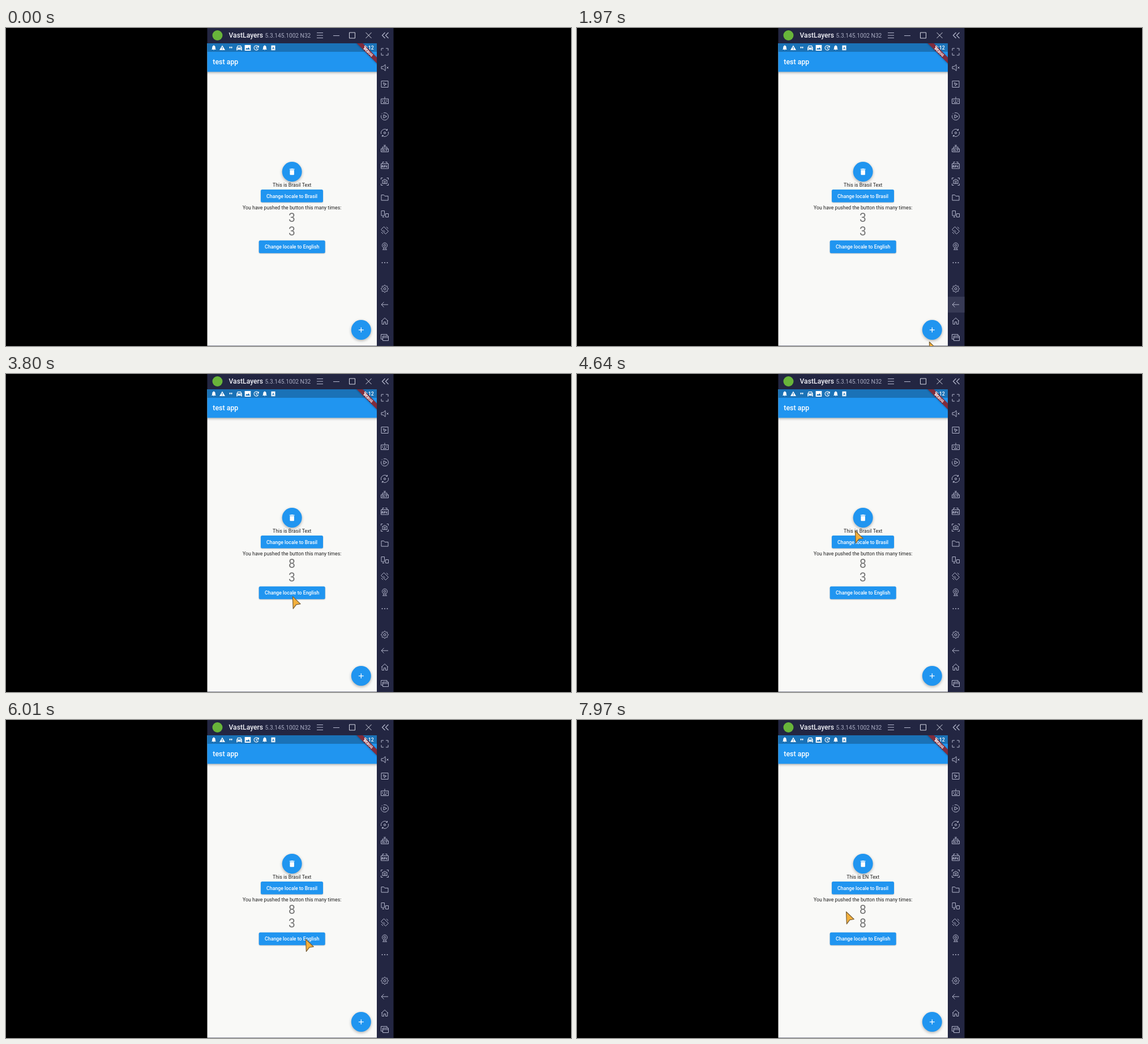
Animation of 998x561 px, one loop 8000 ms. Source, as an HTML page with a canvas:

```html
<!DOCTYPE html>
<html lang="en">
<head>
<meta charset="utf-8">
<title>Locale counter</title>
<style>
html, body { margin: 0; width: 100%; height: 100%; overflow: hidden; background: #000; }
canvas { display: block; width: 998px; height: 561px; }
</style>
</head>
<body>
<canvas id="stage" width="998" height="561"></canvas>
<script>
const c = document.getElementById('stage').getContext('2d');
const LOOP = 8000;
const BLUE = '#2095f0', FRAME = '#232642', ICON = '#b4b7cd';
const LEFT = 355.5, WIDTH = 299.5, TOP = 27;
const TRASH = new Path2D('M6 19c0 1.1.9 2 2 2h8c1.1 0 2-.9 2-2V7H6v12zM19 4h-3.5l-1-1h-5l-1 1H5v2h14V4z');
const PLUS = new Path2D('M19 13h-6v6h-2v-6H5v-2h6V5h2v6h6v2z');
const ARROW = new Path2D('M.5 .8L14.3 14L6.8 15.2L1.4 22.4Z');
const BELL = new Path2D('M-4 3H4L2.8 1.6V-1Q2.6-3.6.6-3.9V-4.6H-.6V-3.9Q-2.6-3.6-2.8-1V1.6ZM-1 3.5H1L0 4.6Z');

// Sidebar icons, drawn around their own centre
const SIDE = [
  [42, 'M-6-2V-6H-2M2-6H6V-2M6 2V6H2M-2 6H-6V2'],
  [70, 'M-6-2H-3L1-5.5V5.5L-3 2H-6ZM3.5-1.5L6.5 1.5M6.5-1.5L3.5 1.5'],
  [99, 'M-6-5.5H6V5.5H-6ZM-2.5-2.5L3 0L.5 .8L-.5 3.2Z'],
  [128, 'M-6.5-3H6.5V5.5H-6.5ZM0-3V-6.5M-4.5-.5H-3M-1-.5H1M3-.5H4.5M-4.5 1.5H-3M-1 1.5H1M3 1.5H4.5M-3 3.5H3'],
  [156, 'M-2-6.2A6.5 6.5 0 1 1-6.2-2M-5.5-4.2L-4.2-5.4M-2-3L3.5 0L-2 3Z'],
  [185, 'M-6.2 2A6.5 6.5 0 0 1 4.5-4.6M6.2-2A6.5 6.5 0 0 1-4.5 4.6M4.5-7V-4.4H2M-4.5 7V4.4H-2M-1.6 0A1.6 1.6 0 1 0 1.6 0A1.6 1.6 0 1 0-1.6 0'],
  [213, 'M-6.5 0H6.5V5.5H-6.5ZM-4 0V-3H4V0M0-3V-6M-2-6H2M-4 4V2H-2V4M0 2V4M3 2V4M2 2H4.5'],
  [242, 'M-6.5-2.5H6.5V6H-6.5ZM-4-2.5V-5.5H-1M4-2.5V-5.5H1M-5 4V.5H-3V4M-5 2.5H-3M-1 4V.5H1V2.5H-1M3 .5V4M5 .5L3 2.2L5 4'],
  [271, 'M-6.5-3.5V-6.5H-3.5M3.5-6.5H6.5V-3.5M6.5 3.5V6.5H3.5M-3.5 6.5H-6.5V3.5M-4-2.5H-2L-1-4H1L2-2.5H4V3.5H-4ZM-1.5.5A1.5 1.5 0 1 0 1.5.5A1.5 1.5 0 1 0-1.5.5'],
  [299, 'M-6-4.5H-1.5L0-2.5H6V5H-6Z'],
  [328, 'M-6-5.5H-.5V3H-6ZM1.5-.5H6.5V5.5H1.5ZM-4 5.5H-1M-3 4.5L-4 5.5'],
  [357, 'M-6.5-1.5L-1.5-6.5L6.5 1.5L1.5 6.5ZM3-6.2L6-3M-6 3L-3 6.2M-2.5-.5L.5 2.5'],
  [385, 'M-4.5-1.5A4.5 4.5 0 1 0 4.5-1.5A4.5 4.5 0 1 0-4.5-1.5M-1.8-1.5A1.8 1.8 0 1 0 1.8-1.5A1.8 1.8 0 1 0-1.8-1.5M-2 3V5.5M2 3V5.5M-4 6H4'],
  [488, 'M6 0H-6M-1.5-4.5L-6 0L-1.5 4.5'],
  [517, 'M-6 0L0-5.5L6 0M-4.8-1V5.5H-1.5V1.5H1.5V5.5H4.8V-1'],
  [546, 'M-3.5-2.5H6.5V5.5H-3.5ZM-3.5 3H-6.5V-5.5H4V-2.5M-3.5 0H6.5']
].map(([y, d]) => [y, new Path2D(d)]);

// Pointer waypoints: time, x, y
const PASS = [[30, 671, 12], [130, 505, 532]];
const PATH = [
  [1270, 672, 40], [1500, 424, 230], [1800, 660, 480], [1970, 622, 553],
  [2070, 613, 540], [2140, 624, 536], [2300, 624, 536], [2400, 629, 536],
  [3400, 629, 536], [3800, 506, 392], [4100, 498, 275], [4240, 500, 298],
  [4640, 491, 276], [4800, 487, 282], [5040, 531, 296], [5250, 512, 275],
  [5500, 557, 330], [5750, 545, 401], [5910, 529, 386], [7370, 529, 386],
  [7450, 534, 388], [7800, 464, 346], [7970, 475, 337.5], [8000, 475, 337.5]
];
const CLICKS = [2580, 2750, 2910, 3070, 3230];
const PRESS = 6400, SWAP = 6560;

function slope(keys, i, axis) {
  const a = keys[i - 1], b = keys[i], d = keys[i + 1];
  if (!a || !d) return 0;
  if ((a[1] === b[1] && a[2] === b[2]) || (d[1] === b[1] && d[2] === b[2])) return 0;
  const before = b[axis] - a[axis], after = d[axis] - b[axis];
  return before * after <= 0 ? 0 : (before + after) / (d[0] - a[0]);
}

function pointAt(keys, t) {
  const i = keys.findIndex((k, n) => n + 1 < keys.length && t >= k[0] && t < keys[n + 1][0]);
  if (i < 0) return null;
  const a = keys[i], b = keys[i + 1], span = b[0] - a[0], u = (t - a[0]) / span;
  const s = u * u * (3 - 2 * u);
  return [1, 2].map(k => a[k] + (b[k] - a[k]) * s +
    span * (slope(keys, i, k) * u * (1 - u) ** 2 - slope(keys, i + 1, k) * u * u * (1 - u)));
}

function rect(x, y, w, h, fill) {
  c.fillStyle = fill;
  c.fillRect(x, y, w, h);
}

function disc(x, y, r, fill) {
  c.fillStyle = fill;
  c.beginPath();
  c.arc(x, y, r, 0, Math.PI * 2);
  c.fill();
}

function text(s, x, y, size, fill, weight = 400, align = 'center') {
  c.font = `${weight} ${size}px Roboto, sans-serif`;
  c.textAlign = align;
  c.fillStyle = fill;
  c.fillText(s, x, y);
}

function at(x, y, draw, scale = 1) {
  c.save();
  c.translate(x, y);
  c.scale(scale, scale);
  draw();
  c.restore();
}

function line(x, y, path, color = ICON, width = 1) {
  at(x, y, () => {
    c.strokeStyle = color;
    c.lineWidth = width;
    c.stroke(typeof path === 'string' ? new Path2D(path) : path);
  });
}

function fill(x, y, path, color = '#fff', scale = 1) {
  at(x, y, () => {
    c.fillStyle = color;
    c.fill(typeof path === 'string' ? new Path2D(path) : path, 'evenodd');
  }, scale);
}

function shadow(blur, dy, alpha) {
  c.shadowColor = `rgba(0,0,0,${alpha})`;
  c.shadowBlur = blur;
  c.shadowOffsetY = dy;
}

function clipApp() {
  c.beginPath();
  c.rect(LEFT, TOP, WIDTH, 533.5);
  c.clip();
}

// White splash spreading inside a clipped shape
function splash(shape, x, y, reach, age, life) {
  if (age < 0 || age >= life) return;
  const u = age / life;
  c.save();
  c.clip(shape);
  disc(x, y, reach * (0.3 + 0.7 * Math.sqrt(u)), `rgba(255,255,255,${0.24 * (1 - u * u)})`);
  c.restore();
}

function fab(x, y, icon, age) {
  const lift = age >= 0 && age < 200 ? Math.sin(age / 200 * Math.PI) : 0;
  c.save();
  shadow(5 + 3 * lift, 1.8 + lift, 0.3);
  disc(x, y, 17.5, BLUE);
  c.restore();
  const shape = new Path2D();
  shape.arc(x, y, 17.5, 0, Math.PI * 2);
  splash(shape, x, y, 18, age, 200);
  fill(x - 7.5, y - 7.5, icon, '#fff', 0.625);
}

function button(x, y, w, label, age) {
  const life = 670, shape = new Path2D();
  const lift = age >= 0 && age < life ? Math.sin(age / life * Math.PI) : 0;
  shape.roundRect(x, y, w, 22.5, 2.5);
  c.save();
  shadow(2 + 5 * lift, 0.8 + 2 * lift, 0.25);
  c.fillStyle = BLUE;
  c.fill(shape);
  c.restore();
  splash(shape, 529, 386, 90, age, life);
  text(label, x + w / 2, y + 14.5, 8.75, '#fff', 500);
}

function titleBar() {
  rect(LEFT, 0, 329, 27, FRAME);
  disc(373.5, 13, 9, '#68b53a');
  text('VastLayers', 393.5, 17, 12.2, '#f0f0f6', 500, 'left');
  text('5.3.145.1002 N32', 457.5, 17, 10.2, '#a9acc2', 400, 'left');
  line(554.5, 13, 'M-5.5-4.5H5.5M-5.5 0H5.5M-5.5 4.5H5.5');
  line(583.5, 13, 'M-5.5 .5H5.5');
  line(611.5, 13, 'M-5-5H5V5H-5Z', '#d6d8e4');
  line(640.5, 13, 'M-5-5L5 5M5-5L-5 5', '#d6d8e4');
  line(670, 13, 'M-.5-5L-5.5 0L-.5 5M5.5-5L.5 0L5.5 5', ICON, 1.2);
}

function sideBar(hover) {
  rect(655, 27, 29.5, 534, FRAME);
  if (hover) rect(655, 474, 29.5, 28, '#373a55');
  for (const [y, path] of SIDE) line(669, y, path);
  for (const dx of [-4.5, 0, 4.5]) disc(669 + dx, 414, 1, ICON);
  const gear = new Path2D();
  for (let i = 0; i <= 64; i++) {
    const a = i / 64 * Math.PI * 2, r = 5.6 + Math.max(-0.8, Math.min(0.8, 2 * Math.cos(a * 8)));
    gear.lineTo(r * Math.cos(a), r * Math.sin(a));
  }
  gear.moveTo(2, 0);
  gear.arc(0, 0, 2, 0, Math.PI * 2);
  line(669, 460, gear);
}

function statusBar() {
  rect(LEFT, TOP, WIDTH, 15, '#1a72b7');
  fill(367, 35, BELL);
  fill(382, 35, 'M0-4.5L5 4H-5ZM-.6-1.5V1.2H.6V-1.5ZM-.6 2V3H.6V2Z');
  fill(397, 34.5, 'M-2.5-1.5H-.5V.5L-1.5 1.8H-2.3L-1.6 .5H-2.5ZM.5-1.5H2.5V.5L1.5 1.8H.7L1.4.5H.5Z');
  fill(412, 35, 'M-3-4H3L4.8 0V4.5H3.3V3.2H-3.3V4.5H-4.8V0ZM-2.3-2.8L-3.2-.5H3.2L2.3-2.8ZM-3.5 1V2H-2V1ZM2 1V2H3.5V1Z');
  fill(427, 35, 'M-5.3-5H5.3V5H-5.3ZM-4 3H4L1.5-1L-.5 1.5L-2 0Z');
  line(442, 35, 'M3.8-1.5A4 4 0 1 0 3.8 1.5M4.2-4V-1H1.5M0-2V.5L1.8 1.5', '#fff', 1.1);
  fill(457, 35, BELL);
  fill(472, 35, 'M-3.5-4.2H3.5V4.2H-3.5ZM0-2.5L-2 2.5H-1L-.6 1.4H.6L1 2.5H2ZM0-.8L.4 .5H-.4Z');
}

function banner() {
  c.save();
  clipApp();
  c.translate(655, TOP);
  c.rotate(Math.PI / 4);
  c.save();
  shadow(3, 1, 0.3);
  rect(-27, 17.5, 54, 7.5, '#802c3c');
  c.restore();
  text('DEBUG', 0, 23.6, 6.4, '#fff', 900);
  c.restore();
  text('8:12', 641, 38.2, 8.8, '#fff', 500);
}

function app(t) {
  const clicks = CLICKS.filter(k => t >= k);
  const count = 3 + clicks.length, english = t >= SWAP;
  rect(LEFT, TOP, WIDTH, 533.5, '#f9f9f7');
  c.save();
  clipApp();
  shadow(4, 1.4, 0.3);
  rect(LEFT - 5, TOP, WIDTH + 10, 50.3, BLUE);
  c.restore();
  statusBar();
  text('test app', 365.3, 64, 12.4, '#fff', 500, 'left');
  banner();

  fab(505.2, 253.5, TRASH, -1);
  text(english ? 'This is EN Text' : 'This is Brasil Text', 505.2, 279.7, 8.75, '#212121');
  button(450, 285, 110, 'Change locale to Brasil', -1);
  text('You have pushed the button this many times:', 505.2, 319.6, 8.75, '#212121');
  text(count, 505, 341.5, 21.25, '#757575');
  text(english ? count : 3, 505, 366.3, 21.25, '#757575');
  button(446.7, 374.8, 117, 'Change locale to English', t - PRESS);
  fab(627.3, 532.5, PLUS, clicks.length ? t - clicks[clicks.length - 1] : -1);
}

function pointer(t) {
  const p = pointAt(PASS, t) || pointAt(PATH, t);
  if (!p) return;
  at(p[0], p[1], () => {
    c.fillStyle = '#f3b03c';
    c.strokeStyle = '#7a6038';
    c.lineWidth = 1.2;
    c.lineJoin = 'round';
    c.fill(ARROW);
    c.stroke(ARROW);
  });
}

function draw(t) {
  rect(0, 0, 998, 561, '#000');
  titleBar();
  sideBar(t >= 1780 && t < 2060);
  rect(LEFT, 560, 300, 1, FRAME);
  app(t);
  pointer(t);
}

const start = performance.now();
function tick() {
  draw((performance.now() - start) % LOOP);
  requestAnimationFrame(tick);
}
tick();
</script>
</body>
</html>
```
